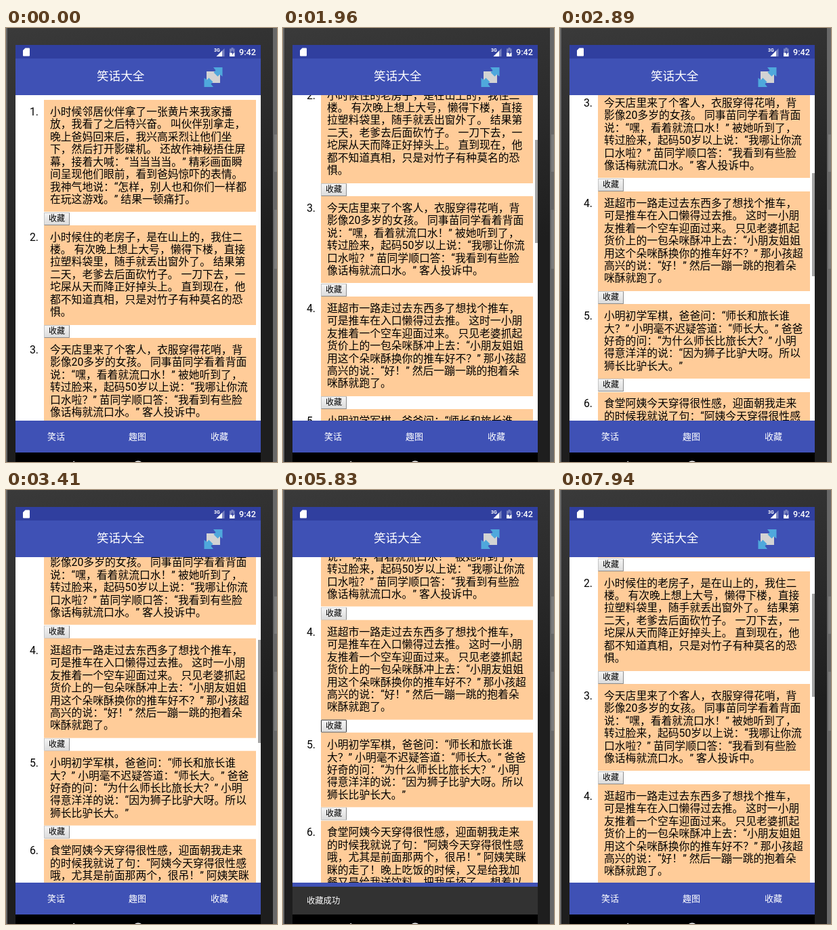
An HTML page for the animation above (8 s loop, 400 by 640 pixels).

```html
<!DOCTYPE html>
<html lang="zh-CN">
<head>
<meta charset="utf-8">
<title>笑话大全</title>
<style>
html, body { margin: 0; width: 100%; height: 100%; overflow: hidden; }
body { position: relative; background: linear-gradient(165deg, #3a3a3a, #1e1e1e 55%); color: #000; font: 15.8px/18.46px Roboto, "Noto Sans CJK SC", "Noto Sans CJK", sans-serif; white-space: pre; text-spacing-trim: space-all; }
div, svg { position: absolute; box-sizing: border-box; }
#page { left: 14px; top: 99px; width: 362px; height: 480px; background: #fff; overflow: hidden; }
#list { left: 0; top: 0; width: 362px; }
.num { left: 0; width: 34px; text-align: right; }
.joke { left: 42px; width: 313px; padding: 8.8px 9px; background: #fc9; }
.save { left: 42px; width: 38px; height: 19px; border: 1px solid #a9a9a9; border-color: #c4c4c4 #8c8c8c #8c8c8c #c4c4c4; border-radius: 1px; background: linear-gradient(#f4f4f4, #dcdcdc); font-size: 12px; line-height: 16px; text-align: center; }
.save.focus { border-color: #333; }
.save.down { background: #c4c4c4; }
#thumb { left: 358px; width: 4px; height: 152px; background: rgba(128, 128, 128, .72); }
.bar { left: 14px; width: 362px; background: #3f51b5; color: #fff; }
#tabs { top: 579px; height: 47px; overflow: hidden; font-size: 13px; }
#tabs .tab { top: 15px; width: 60px; text-align: center; }
#snack { left: 0; width: 362px; height: 42px; background: #323232; font-size: 12.3px; line-height: 42px; padding-left: 21px; }
</style>
</head>
<body>
<div id="page"><div id="list"></div><div id="thumb"></div></div>
<div class="bar" style="top:25px;height:21px;background:#303f9f"></div>
<div class="bar" style="top:45px;height:54px"></div>
<div style="left:134px;top:61px;color:#fff;font-size:17.6px;line-height:20px">笑话大全</div>
<div id="tabs" class="bar">
  <div class="tab" style="left:30px">笑话</div>
  <div class="tab" style="left:150px">趣图</div>
  <div class="tab" style="left:271px">收藏</div>
  <div id="snack">收藏成功</div>
</div>
<svg width="400" height="640" style="left:0;top:0" fill="#fff">
  <path d="M0 0h2v640h-2zM394 0h6v640h-6z" fill="#686868"/>
  <path d="M396 157h4v55h-4zM396 268h4v87h-4z" fill="#7c7c7c"/>
  <path d="M14 626h362v14h-362z" fill="#000"/>
  <path d="M101 638.5v14l-12-7z"/>
  <circle cx="195" cy="646" r="7" fill="none" stroke="#fff" stroke-width="1.6"/>
  <path d="M28.500 29.500h5.500q1 0 1 1v10q0 1-1 1h-8q-1 0-1-1v-7.500z"/>
  <path d="M322.500 30v12h-12z" fill-opacity=".35"/>
  <path d="M319 33.500v8.500h-8.500z"/>
  <path d="M332.500 29h3v1.500h2v6h-7.500v-6h2.500z" fill-opacity=".35"/>
  <path d="M330 36.500h7.500v5.500h-7.500z"/>
  <path d="M334.500 32l-2.500 4.500h2v3.500l2.500-4.800h-2z" fill="#303f9f"/>
  <text x="307" y="35" font-size="7" font-weight="700">3G</text>
  <text x="344" y="40" font-size="12.600" font-weight="500">9:42</text>
  <path d="M296 64h20v17h-20z" fill="#d3d3d3"/>
  <path id="arrow" d="M306 58h13.500v13.500l-4-3-3 3-6-6 3-3z" fill="#4fa8dc"/>
  <use href="#arrow" transform="rotate(180 306 72.500)"/>
</svg>
<script>
const jokes = [
`小时候邻居伙伴拿了一张黄片来我家播
放，我看了之后特兴奋。 叫伙伴别拿走，
晚上爸妈回来后，我兴高采烈让他们坐
下，然后打开影碟机。 还故作神秘捂住屏
幕，接着大喊：“当当当当。” 精彩画面瞬
间呈现他们眼前，看到爸妈惊吓的表情。
我神气地说：“怎样，别人也和你们一样都
在玩这游戏。” 结果一顿痛打。`,
`小时候住的老房子，是在山上的，我住二
楼。 有次晚上想上大号，懒得下楼，直接
拉塑料袋里，随手就丢出窗外了。 结果第
二天，老爹去后面砍竹子。 一刀下去，一
坨屎从天而降正好掉头上。 直到现在，他
都不知道真相，只是对竹子有种莫名的恐
惧。`,
`今天店里来了个客人，衣服穿得花哨，背
影像20多岁的女孩。 同事苗同学看着背面
说：“嘿，看着就流口水！” 被她听到了，
转过脸来，起码50岁以上说：“我哪让你流
口水啦？” 苗同学顺口答：“我看到有些脸
像话梅就流口水。” 客人投诉中。`,
`逛超市一路走过去东西多了想找个推车，
可是推车在入口懒得过去推。 这时一小朋
友推着一个空车迎面过来。 只见老婆抓起
货价上的一包朵咪酥冲上去：“小朋友姐姐
用这个朵咪酥换你的推车好不？” 那小孩超
高兴的说：“好！” 然后一蹦一跳的抱着朵
咪酥就跑了。`,
`小明初学军棋，爸爸问：“师长和旅长谁
大？” 小明毫不迟疑答道：“师长大。” 爸爸
好奇的问：“为什么师长比旅长大？” 小明
得意洋洋的说：“因为狮子比驴大呀。所以
狮长比驴长大。”`,
`食堂阿姨今天穿得很性感，迎面朝我走来
的时候我就说了句：“阿姨今天穿得很性感
哦，尤其是前面那两个，很吊！” 阿姨笑眯
眯的走了！晚上吃饭的时候，又是给我加
餐又是给我送饮料，把我乐坏了。 想着以`];

const $ = id => document.getElementById(id);
const list = $('list');

function add(cls, text, top) {
  const el = document.createElement('div');
  el.className = cls;
  el.textContent = text;
  el.style.top = top + 'px';
  return list.appendChild(el);
}

let y = 7;
const buttons = jokes.map((text, i) => {
  const height = text.split('\n').length * 18.46 + 17.6;
  add('num', i + 1 + '.', y + 8.8);
  add('joke', text, y).style.height = height + 'px';
  const button = add('save', '收藏', y + height + .3);
  y += height + 19.5;
  return button;
});

// Keys are [time, value, easing towards the next key]; no easing means hold.
const linear = k => k;
const smooth = k => k * k * (3 - 2 * k);
const scrollKeys = [
  [0, 0], [680, 5], [800, 5, smooth], [1320, 202],
  [1960, 209], [2020, 209, smooth], [2470, 355],
  [2800, 359], [2890, 364], [3060, 364, smooth], [3810, 413.3],
  [7660, 380, linear], [7760, 172], [7940, 171]
];
const thumbKeys = [[0, 0], [680, 1], [4420, .7], [4610, .3], [4660, 0], [7660, 1]];
const snackKeys = [[0, 48], [5560, 48, smooth], [5830, 6], [7270, 6, smooth], [7520, 45], [7660, 48]];

function at(keys, t) {
  const i = keys.findLastIndex(key => key[0] <= t);
  const [start, from, ease] = keys[i];
  if (!ease) return from;
  const [end, to] = keys[i + 1];
  return from + (to - from) * ease((t - start) / (end - start));
}

function draw(now) {
  const t = now % 8000;
  const scroll = at(scrollKeys, t);
  list.style.transform = `translateY(${-scroll}px)`;
  $('thumb').style.top = scroll * .316 + 'px';
  $('thumb').style.opacity = at(thumbKeys, t);
  $('snack').style.top = at(snackKeys, t) + 'px';
  buttons[3].classList.toggle('focus', t >= 5020);
  buttons[3].classList.toggle('down', t >= 5020 && t < 5590);
  requestAnimationFrame(draw);
}
requestAnimationFrame(draw);
</script>
</body>
</html>
```
